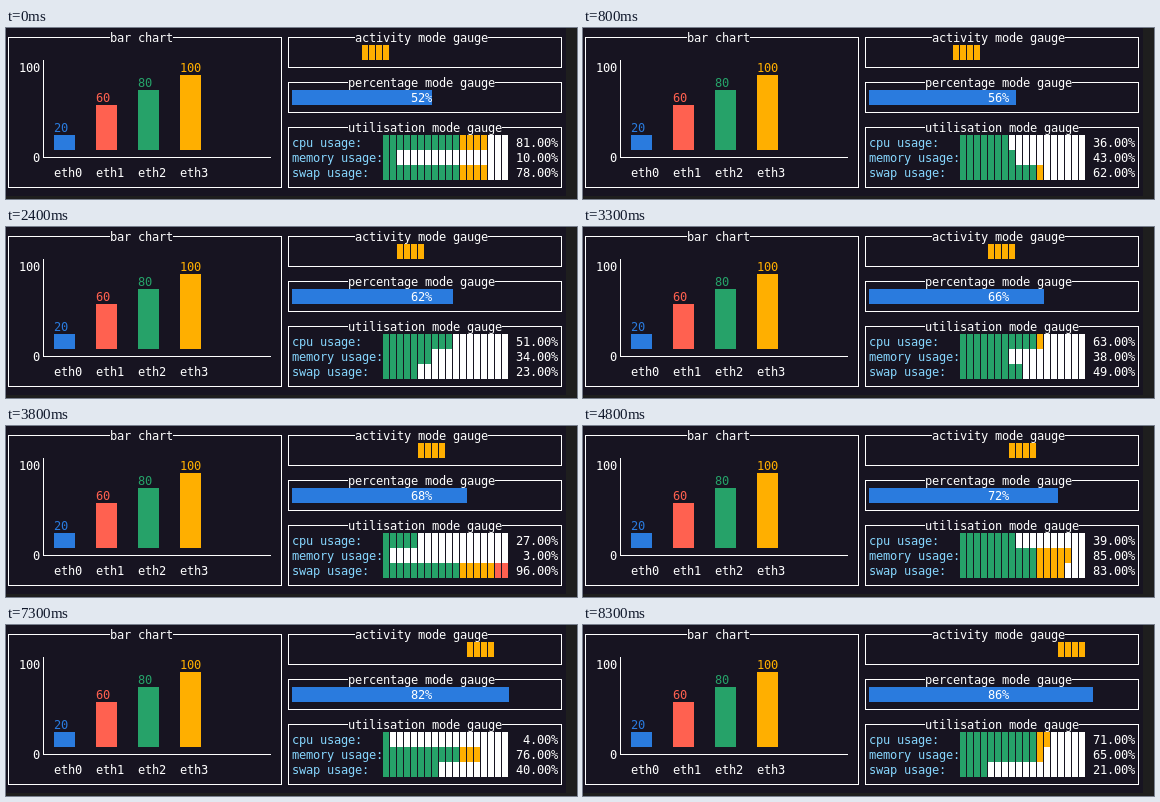
Animation, 571 px wide and 171 px high, one loop 8700 ms. Source, as an HTML page with a canvas:

```html
<!DOCTYPE html>
<html lang="en">
<head>
<meta charset="utf-8">
<title>Terminal gauges</title>
<style>
html, body { margin: 0; width: 100%; height: 100%; overflow: hidden; background: #171421; }
canvas { display: block; }
</style>
</head>
<body>
<canvas id="stage" width="571" height="171"></canvas>
<script>
const ctx = document.getElementById('stage').getContext('2d');

const LOOP = 8700, STEP = 500, FIRST = 300;
const CW = 7, CH = 15, LEFT = -1, TOP = 2;   // terminal cell grid
const BG = '#171421', EDGE = '#1e1e1e', WHITE = '#ffffff', BLUE = '#2a7bde';
const RED = '#ff6150', GREEN = '#26a269', AMBER = '#ffaf00', SKY = '#87d7ff';

// cpu, memory and swap load at each tick
const loads = [
  [81, 10, 78], [47, 29, 55], [36, 43, 62], [68, 74, 41], [90, 57, 32], [51, 34, 23],
  [42, 66, 80], [63, 38, 49], [27, 3, 96], [58, 47, 24], [39, 85, 83], [73, 25, 46],
  [44, 61, 69], [64, 95, 14], [33, 52, 88], [4, 76, 40], [57, 15, 92], [71, 65, 21]
];
const names = ['cpu usage:', 'memory usage:', 'swap usage:'];

const colX = col => LEFT + col * CW;
const rowY = row => TOP + row * CH;

function rect(x, y, w, h, color) {
  ctx.fillStyle = color;
  ctx.fillRect(x, y, w, h);
}

function cells(col, row, w, h, color) {
  rect(colX(col), rowY(row), w * CW, h * CH, color);
}

function slice(col, row, color) {
  rect(colX(col), rowY(row), CW - 1, CH, color);
}

function text(str, col, row, color = WHITE) {
  ctx.fillStyle = color;
  [...str].forEach((ch, i) => ctx.fillText(ch, colX(col + i), rowY(row) + 12));
}

function panel(title, titleCol, col, row, lastCol, lastRow) {
  const x = colX(col) + 3, y = rowY(row) + 7;
  const w = (lastCol - col) * CW, h = (lastRow - row) * CH;
  ctx.strokeStyle = WHITE;
  ctx.lineWidth = 1;
  ctx.strokeRect(x + 0.5, y + 0.5, w, h);
  cells(titleCol, row, title.length, 1, BG);
  text(title, titleCol, row);
}

function barChart() {
  panel('bar chart', 15, 0, 0, 39, 10);
  text('100', 2, 2);
  text('0', 4, 8);
  rect(37, 32, 1, 98, WHITE);
  rect(37, 129, 228, 1, WHITE);
  [[20, 1, BLUE], [60, 3, RED], [80, 4, GREEN], [100, 5, AMBER]].forEach(([value, h, color], i) => {
    const col = 7 + i * 6;
    cells(col, 8 - h, 3, h, color);
    text(String(value), col, 7 - h, color);
    text('eth' + i, col, 9);
  });
}

function activity(tick) {
  panel('activity mode gauge', 50, 40, 0, 79, 2);
  for (let i = 0; i < 4; i++) slice(51 + tick + i, 1, AMBER);
}

function percentage(tick) {
  const value = 52 + tick * 2;
  panel('percentage mode gauge', 49, 40, 3, 79, 5);
  cells(41, 4, Math.max(20, Math.floor(value * 38 / 100)), 1, BLUE);
  text(value + '%', 58, 4);
}

function utilisation(tick) {
  panel('utilisation mode gauge', 49, 40, 6, 79, 10);
  loads[tick].forEach((load, i) => {
    const row = 7 + i, lit = Math.ceil(load * 18 / 100);
    text(names[i], 41, row, SKY);
    for (let c = 0; c < 18; c++) {
      const hot = c < 11 ? GREEN : c < 16 ? AMBER : RED;
      slice(54 + c, row, c < lit ? hot : WHITE);
    }
    text((load.toFixed(2) + '%').padStart(6), 73, row);
  });
}

function draw(now) {
  const t = now % LOOP;
  const tick = t < FIRST ? 0 : Math.floor((t - FIRST) / STEP) + 1;
  rect(0, 0, 571, 171, BG);
  rect(560, 0, 11, 171, EDGE);
  rect(0, 168, 571, 3, EDGE);
  ctx.font = '12px "DejaVu Sans Mono", monospace';
  barChart();
  activity(tick);
  percentage(tick);
  utilisation(tick);
}

const start = performance.now();
function loop() {
  draw(performance.now() - start);
  requestAnimationFrame(loop);
}
loop();
</script>
</body>
</html>
```
